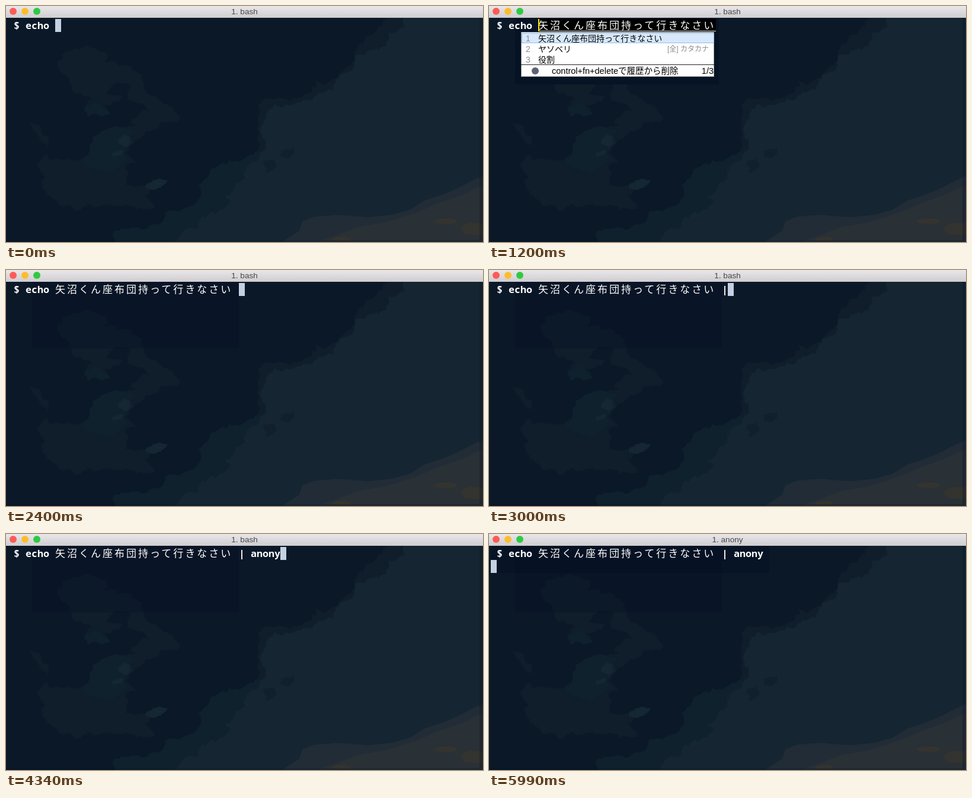
Write an HTML page that moves like this. It is 805x400 px and loops after 8 s.

```html
<!DOCTYPE html>
<html lang="ja">
<head>
<meta charset="utf-8">
<title>Terminal input</title>
<style>
html, body { margin: 0; width: 100%; height: 100%; overflow: hidden; background: #0b1828; }
svg { display: block; width: 805px; height: 400px; }
text { white-space: pre; }
.mono { font: 600 16.67px "Noto Sans Mono", monospace; fill: #fff; }
.wide { font: 500 17px "Noto Sans CJK JP", sans-serif; letter-spacing: 3px; fill: #fff; }
.ui { font: 14px "Liberation Sans", "Noto Sans CJK JP", sans-serif; fill: #000; }
.foot { font-size: 14.5px; }
.num { fill: #8a8a8a; }
.note { font-size: 12px; fill: #8a8a8a; text-anchor: end; }
#title { font: 13.6px "Liberation Sans", sans-serif; fill: #484848; text-anchor: middle; }
</style>
</head>
<body>
<svg viewBox="0 0 805 400">
  <defs>
    <linearGradient id="bar" x2="0" y2="1">
      <stop stop-color="#e9e7e9"/><stop offset="1" stop-color="#cfcdcf"/>
    </linearGradient>
    <filter id="coast" filterUnits="userSpaceOnUse" x="-20" y="-20" width="860" height="460" color-interpolation-filters="sRGB">
      <feTurbulence type="fractalNoise" baseFrequency=".07" numOctaves="2" seed="4"/>
      <feDisplacementMap in="SourceGraphic" scale="14" xChannelSelector="R" yChannelSelector="G"/>
    </filter>
  </defs>

  <!-- desktop showing through the window -->
  <rect width="805" height="400" fill="#0b1828"/>
  <g filter="url(#coast)">
    <g fill="#101e2c">
      <path d="M87 95 98 81 118 72 142 69 160 73 172 83 168 94 198 99 230 117 237 147 264 162 289 180 291 194 262 195 245 212 222 222 207 240 205 252 217 264 203 270 203 302 222 308 250 296 272 294 256 309 230 320 250 338 248 346 200 337 134 338 124 346 90 335 70 320 60 304 64 290 53 270 64 254 85 261 130 260 145 238 150 222 165 210 190 206 214 204 210 190 240 175 225 162 208 160 207 135 186 133 168 148 192 152 190 164 164 166 174 184 136 186 134 172 144 154 112 142 105 122 92 112Z"/>
      <path d="M36 197 50 199 70 222 75 239 62 231Z"/>
      <path d="M642 10 633 33 610 50 592 75 585 95 558 122 536 133 522 126 518 148 480 158 437 157 427 168 425 246 400 260 430 262 600 200 740 10Z"/>
    </g>
    <g fill="#0f212d">
      <path d="M150 222 165 210 195 206 215 212 206 232 200 262 180 282 140 278 132 262Z"/>
      <path d="M136 168 160 164 174 184 136 186Z"/>
      <path d="M425 247 400 260 345 275 342 290 330 295 328 320 320 337 270 352 252 372 183 380 185 420 360 420 480 260Z"/>
    </g>
    <g fill="#142733">
      <ellipse cx="201" cy="227" rx="12" ry="9"/>
      <ellipse cx="190" cy="251" rx="11" ry="6"/>
      <ellipse cx="253" cy="302" rx="19" ry="7" transform="rotate(-20 253 302)"/>
    </g>
    <path fill="#152532" d="M672 10 668 38 646 50 640 68 590 84 588 102 560 122 550 140 526 148 520 156 475 167 445 173 434 198 430 220 440 242 422 262 400 276 404 290 386 308 370 320 376 330 365 346 330 357 322 375 300 380 268 420 830 420 830 10Z"/>
    <path fill="#11202c" d="M463 249 474 242 488 242 476 258 464 256ZM436 264 456 262 456 276 438 281Z"/>
  </g>
  <path fill="#212c36" d="M465 400 495 381 500 365 520 357 560 354 610 358 650 354 682 345 705 330 730 322 760 310 785 297 805 288V400Z"/>
  <path fill="#293036" d="M525 400 560 388 595 374 640 367 690 351 730 334 765 322 805 303V400Z"/>
  <g fill="#33332f">
    <ellipse cx="742" cy="365" rx="20" ry="5"/>
    <path d="M766 376 780 367 805 368V389L775 387Z"/>
    <ellipse cx="566" cy="395" rx="15" ry="4"/>
  </g>
  <path fill="#00101e" opacity=".25" d="M799 20h6v380H0v-3h799Z"/>

  <rect id="shade" y="20" height="113" fill="#051223"/>
  <rect id="lineShade" x="3" y="20" width="470" height="46" fill="#051223" opacity=".55"/>

  <!-- title bar -->
  <rect width="805" height="20" fill="url(#bar)"/>
  <circle cx="12" cy="9" r="6" fill="#fc5b57"/>
  <circle cx="32" cy="9" r="6" fill="#fdbc2e"/>
  <circle cx="52" cy="9" r="6" fill="#30c945"/>
  <text id="title" x="402.5" y="14"></text>

  <!-- command line -->
  <rect id="compose" x="83" y="22" height="22"/>
  <rect id="underline" x="83" y="42" height="1" fill="#fff"/>
  <text class="mono" x="13" y="39">$ echo</text>
  <text id="phrase" class="wide" x="83" y="39"></text>
  <text id="tail" class="mono" x="383" y="39"></text>
  <rect id="caret" y="22" width="2" height="21" fill="#ffe800"/>
  <rect id="cursor" width="10" height="22" fill="#c3d1e3"/>

  <!-- suggestions -->
  <g id="popup">
    <rect id="panel" y="44.5" fill="#fff" stroke="#a0a0a0"/>
    <rect id="picked" x="55.5" y="46.5" width="324" height="16" fill="#d7e8fc" stroke="#8fbbe8"/>
    <text id="option" class="ui" x="83" y="60"></text>
    <text class="ui" x="83" y="78">ヤソベリ</text>
    <text class="ui" x="83" y="96">役割</text>
    <text class="ui note" x="371" y="77">[全] カタカナ</text>
    <path id="rule" stroke="#222"/>
    <text id="hint" class="ui" x="83" y="115">Tabキーで選択</text>
    <g id="chooser">
      <text class="ui num" x="62" y="60">1</text>
      <text class="ui num" x="62" y="78">2</text>
      <text class="ui num" x="62" y="96">3</text>
      <circle cx="78" cy="110" r="6" fill="#5d6272"/>
      <text class="ui foot" x="106" y="115">control+fn+deleteで履歴から削除</text>
      <text class="ui foot" x="379" y="115" text-anchor="end">1/3</text>
    </g>
  </g>
</svg>
<script>
const LOOP = 8000, SUGGEST = 600, CHOOSE = 1200, COMMIT = 1800, ENTER = 5390, RUN = 5990;
const PHRASE = '矢沼くん座布団持って行きなさい';
const TAIL = ' | anony';
const KEYS = [2400, 3000, 3150, 3750, 3890, 4040, 4190, 4340];

const el = id => document.getElementById(id);
const set = (id, attrs) => {
  for (const name in attrs) el(id).setAttribute(name, attrs[name]);
};
const show = (id, on) => { el(id).style.display = on ? '' : 'none'; };
const write = (id, text) => {
  if (el(id).textContent !== text) el(id).textContent = text;
};

function draw(t) {
  const composing = t >= SUGGEST && t < COMMIT;
  const choosing = composing && t >= CHOOSE;
  const typed = KEYS.filter(k => t >= k).length;
  const width = choosing ? 300 : 20;

  write('title', t < RUN ? '1. bash' : '1. anony');
  write('phrase', t < SUGGEST ? '' : t < CHOOSE ? 'や' : PHRASE);
  write('tail', TAIL.slice(0, typed));

  for (const id of ['compose', 'underline', 'caret', 'popup']) show(id, composing);
  for (const id of ['picked', 'chooser']) show(id, choosing);
  show('hint', !choosing);
  show('shade', t >= SUGGEST);
  show('lineShade', t >= ENTER);
  show('cursor', !composing);

  set('compose', { width });
  set('underline', { width });
  set('caret', { x: choosing ? 83 : 103 });
  const left = choosing ? 54 : 78;
  set('panel', { x: left + .5, width: 379 - left, height: choosing ? 75 : 74 });
  set('rule', { d: `M${left} 99.5H380` });
  set('shade', composing
    ? { x: left - 10, width: (choosing ? 388 : 390) - left + 10, opacity: .8 }
    : { x: 44, width: 349, opacity: .4 });

  const entered = t >= ENTER;
  set('cursor', {
    x: entered ? 3 : t < SUGGEST ? 83 : 383 + 10 * typed,
    y: entered ? 44 : 22
  });
}

write('option', PHRASE);
function tick() {
  draw(performance.now() % LOOP);
  requestAnimationFrame(tick);
}
tick();
</script>
</body>
</html>
```
